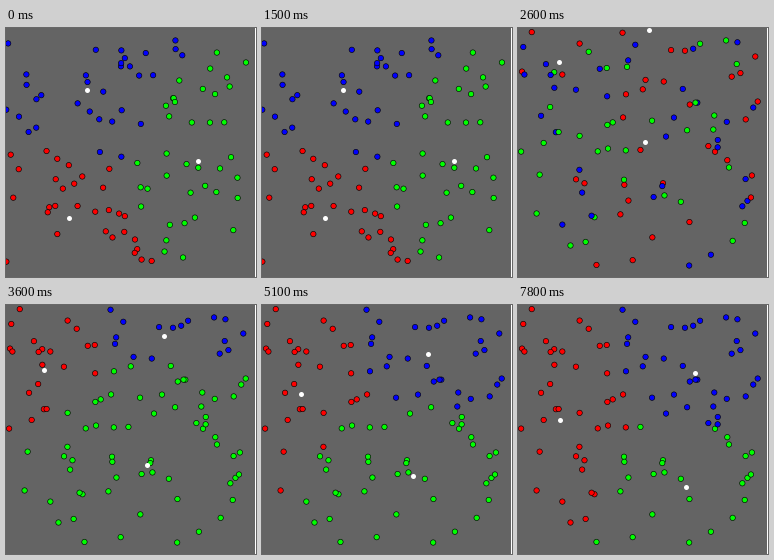
These frames come from a looping animation (250 px wide and 249 px high, 8000 ms). A matplotlib script:

```python
import numpy as np
import matplotlib.pyplot as plt
from matplotlib.animation import FuncAnimation

WIDTH, HEIGHT, DPI = 250, 249, 64
PX = 72 / DPI
FIELD = 249          # the grey field leaves a white column at the right
SPREAD = 240         # points fall in a square of this side
COUNT = 100
COLORS = np.array(["#ff0000", "#00ff00", "#0000ff"])
INTERVAL, FRAMES = 100, 80
CLEAR_AT, RESTART_AT, STEP_FRAMES = 16, 26, 10

# Centers of the red, green and blue cluster.
SETTLED_CENTERS = np.array([(63, 190), (192, 133), (81, 62)])
CENTER_STEPS = np.array([
    [(41, 34), (127, 114), (131, 2)],
    [(38, 65), (141, 160), (158, 31)],
    [(39, 89), (151, 171), (166, 49)],
    [(39, 103), (160, 178), (170, 60)],
    [(42, 112), (168, 180), (173, 64)],
    [(42, 115), (168, 182), (177, 68)],
])


def scatter_points(seed):
    return np.random.default_rng(seed).uniform(0, SPREAD, (COUNT, 2))


def nearest(points, centers):
    gaps = points[:, None] - centers[None]
    return (gaps ** 2).sum(axis=2).argmin(axis=1)


settled_points = scatter_points(3)
run_points = scatter_points(8)


def state(frame):
    """Points, cluster labels and centers shown in a frame."""
    if frame < CLEAR_AT:
        return settled_points, nearest(settled_points, SETTLED_CENTERS), SETTLED_CENTERS
    step = (frame - RESTART_AT) // STEP_FRAMES
    if step == 0:
        labels = np.arange(COUNT) % 3
    else:
        labels = nearest(run_points, CENTER_STEPS[step - 1])
    return run_points, labels, CENTER_STEPS[step]


fig = plt.figure(figsize=(WIDTH / DPI, HEIGHT / DPI), dpi=DPI, facecolor="white")
ax = fig.add_axes([0, 0, FIELD / WIDTH, 1], facecolor="#646464")
ax.set(xlim=(0, FIELD), ylim=(HEIGHT, 0), xticks=[], yticks=[])
ax.spines[:].set_visible(False)
dots = ax.scatter([], [], s=(5.4 * PX) ** 2, edgecolors="black",
                  linewidths=0.6 * PX, snap=False)
marks = ax.scatter([], [], s=(5 * PX) ** 2, color="white", linewidths=0,
                   snap=False, zorder=3)


def draw(frame):
    blank = CLEAR_AT <= frame < RESTART_AT
    ax.set_visible(not blank)
    if not blank:
        points, labels, centers = state(frame)
        dots.set_offsets(points)
        dots.set_facecolor(COLORS[labels])
        marks.set_offsets(centers)
    return dots, marks


anim = FuncAnimation(fig, draw, frames=FRAMES, interval=INTERVAL,
                     repeat=True, repeat_delay=0, blit=False)
plt.show()
```
